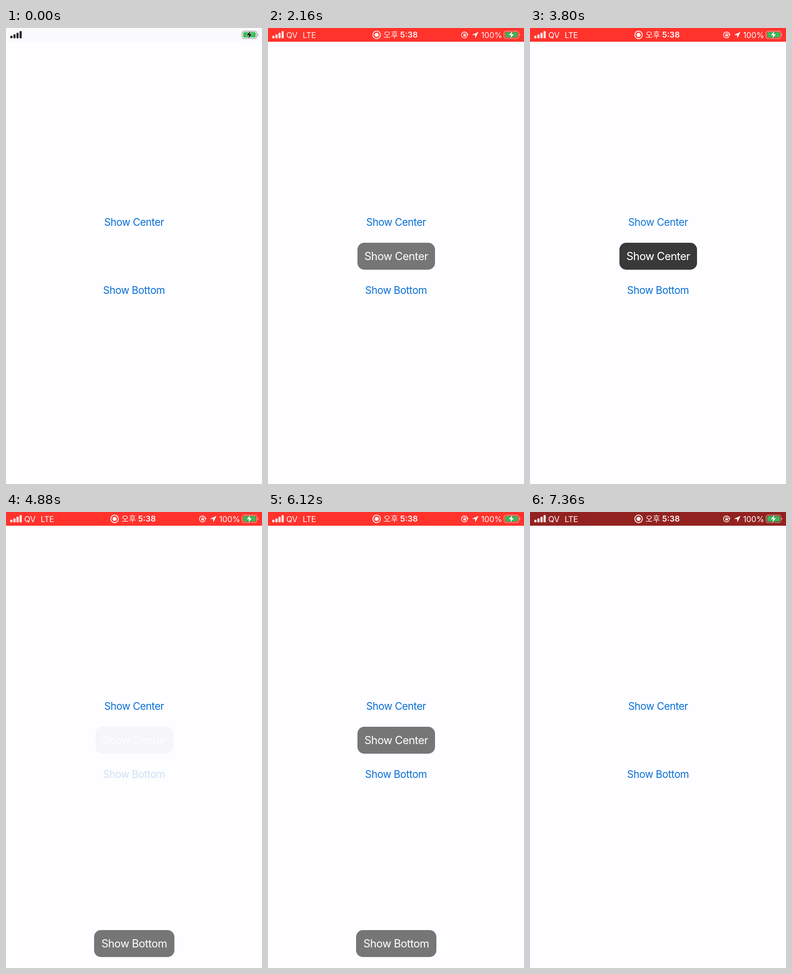
Animation of 561 by 998 pixels, one loop 7.4 s. Source, as an HTML page:

```html
<!DOCTYPE html>
<html lang="ko">
<head>
<meta charset="utf-8">
<title>Toast demo</title>
<style>
  html, body { margin: 0; width: 100%; height: 100%; overflow: hidden; background: #fefdff; }
  svg { display: block; width: 100vw; height: 100vh; }
  text { font-family: Inter, "Noto Sans CJK KR", "Noto Sans CJK", sans-serif; }
  .label { font-size: 22.4px; letter-spacing: -.022em; text-anchor: middle; fill: #0a70d6; }
  .toast text { font-size: 23.9px; letter-spacing: -.024em; text-anchor: middle; fill: #fff; }
  .status text { font-size: 17.5px; fill: #fff; }
  .hangul { font-family: "Noto Sans CJK KR", "Noto Sans CJK", sans-serif; }
</style>
</head>
<body>
<svg viewBox="0 0 561 998">
  <defs>
    <g id="signal">
      <rect x="9.5" y="17" width="4.6" height="5.5" rx="1.2"/>
      <rect x="16.3" y="14" width="4.6" height="8.5" rx="1.2"/>
      <rect x="23" y="10.5" width="4.6" height="12" rx="1.2"/>
      <rect x="29.8" y="6.8" width="4.6" height="15.7" rx="1.2"/>
    </g>
    <g id="battery">
      <rect x="517.3" y="6.7" width="32.4" height="16.4" rx="4.8" fill="none" stroke="currentColor" stroke-width="1.4" opacity=".55"/>
      <path d="M551.2 12.2q1.8 .8 1.8 2.7t-1.8 2.7z" fill="currentColor" opacity=".55"/>
      <rect x="519.7" y="9" width="27.6" height="11.8" rx="2.8" fill="#35bd57"/>
    </g>
    <path id="bolt" d="M535.6 6.2l-8.3 9.7h5.4l-1.9 7.4 8.4-9.8h-5.4z"/>
    <g id="record">
      <circle r="8.3" fill="none" stroke="#fff" stroke-width="1.8"/>
      <circle r="4.6" fill="#fff"/>
    </g>
  </defs>
  <rect width="561" height="998" fill="#fefdff"/>

  <g id="plain">
    <rect width="561" height="30" fill="#fbfafc"/>
    <use href="#signal" fill="#262427"/>
    <use href="#battery" color="#4a484b"/>
    <use href="#bolt" fill="#111" stroke="#fff" stroke-width="1.4" paint-order="stroke"/>
  </g>

  <g class="status" id="red">
    <rect id="bar" width="561" height="30"/>
    <g id="notice">
      <use href="#record" x="251" y="15"/>
      <text class="hangul" x="266" y="21.3" font-weight="300">기록 중</text>
    </g>
    <g id="clock">
      <use href="#signal" fill="#fff"/>
      <text x="40" y="21.6">QV</text>
      <text x="76" y="21.6" letter-spacing="-.4">LTE</text>
      <use href="#record" x="238" y="15"/>
      <text class="hangul" x="253" y="21.4" font-weight="500">오후</text>
      <text x="289.5" y="21.4" font-weight="600">5:38</text>
      <g fill="none" stroke="#fff" stroke-width="1.5">
        <path d="M436.3 18.5a6.6 6.6 0 1 1 .8-4.6"/>
        <path d="M429.1 14.6v-1.5a1.8 1.8 0 0 1 3.6 0v1.5" stroke-width="1.1"/>
      </g>
      <path d="M434.4 13.8h5l-2.5 3.6zM428.2 14.3h5.4v4.2h-5.4z" fill="#fff"/>
      <path d="M461.3 8.5l-14.6 6.6 7.2.5.5 7z" fill="#fff"/>
      <text x="467" y="21.6" letter-spacing="-.1">100%</text>
      <use href="#battery" color="#fff"/>
      <use href="#bolt" fill="#fff" stroke="#26853f" stroke-width="1.4" paint-order="stroke"/>
    </g>
  </g>

  <text class="label" id="center" x="280.7" y="433">Show Center</text>
  <text class="label" id="bottom" x="280.5" y="582.4">Show Bottom</text>
  <g id="toasts"></g>
</svg>
<script>
const LOOP = 7400, FADE = 400, LIFE = 1500, RELEASE = 420;
const $ = id => document.getElementById(id);
const clamp = v => Math.min(1, Math.max(0, v));
const ramp = (t, start, length) => {
  const x = clamp((t - start) / length);
  return x * x * (3 - 2 * x);
};

const places = {
  center: { text: 'Show Center', x: 196, y: 470, w: 170 },
  bottom: { text: 'Show Bottom', x: 193, y: 915, w: 176 }
};
// Each tap: button, finger down, finger up.
const taps = [
  ['center', 930, 1050],
  ['bottom', 2170, 2290],
  ['center', 2980, 3100],
  ['center', 3320, 3440],
  ['bottom', 4280, 4400],
  ['bottom', 4850, 5020],
  ['center', 5480, 5600]
].map(([button, down, up]) => ({ button, down, up, node: makeToast(places[button]) }));

function makeToast({ text, x, y, w }) {
  const node = document.createElementNS('http://www.w3.org/2000/svg', 'g');
  node.setAttribute('class', 'toast');
  node.innerHTML = `<rect x="${x}" y="${y}" width="${w}" height="59" rx="15" fill-opacity=".535"/>
    <text x="${x + w / 2}" y="${y + 38.2}">${text}</text>`;
  $('toasts').append(node);
  return node;
}

const barKeys = [
  [0, [227, 48, 42]], [1280, [227, 48, 42]], [1700, [255, 50, 44]],
  [7140, [255, 50, 44]], [7350, [146, 34, 32]], [LOOP, [146, 34, 32]]
];
function barColor(t) {
  const i = barKeys.findIndex(key => key[0] > t);
  const [t0, a] = barKeys[i - 1], [t1, b] = barKeys[i];
  const k = ramp(t, t0, t1 - t0);
  return `rgb(${a.map((v, n) => Math.round(v + (b[n] - v) * k))})`;
}

function buttonOpacity(name, t) {
  const tap = taps.filter(p => p.button === name && p.down <= t).pop();
  if (!tap) return 1;
  return t < tap.up ? 1 - .8 * clamp((t - tap.down) / 30) : .2 + .8 * ramp(t, tap.up, RELEASE);
}

function draw(t) {
  $('red').setAttribute('opacity', ramp(t, 80, 260));
  $('bar').setAttribute('fill', barColor(t));
  const swap = ramp(t, 1950, 250);
  $('notice').setAttribute('opacity', 1 - swap);
  $('clock').setAttribute('opacity', swap);
  for (const name in places) $(name).setAttribute('opacity', buttonOpacity(name, t));
  for (const { up, node } of taps) {
    node.setAttribute('opacity', ramp(t, up, FADE) * (1 - ramp(t, up + LIFE - FADE, FADE)));
  }
}

const begin = performance.now();
function tick() {
  draw((performance.now() - begin) % LOOP);
  requestAnimationFrame(tick);
}
tick();
</script>
</body>
</html>
```
